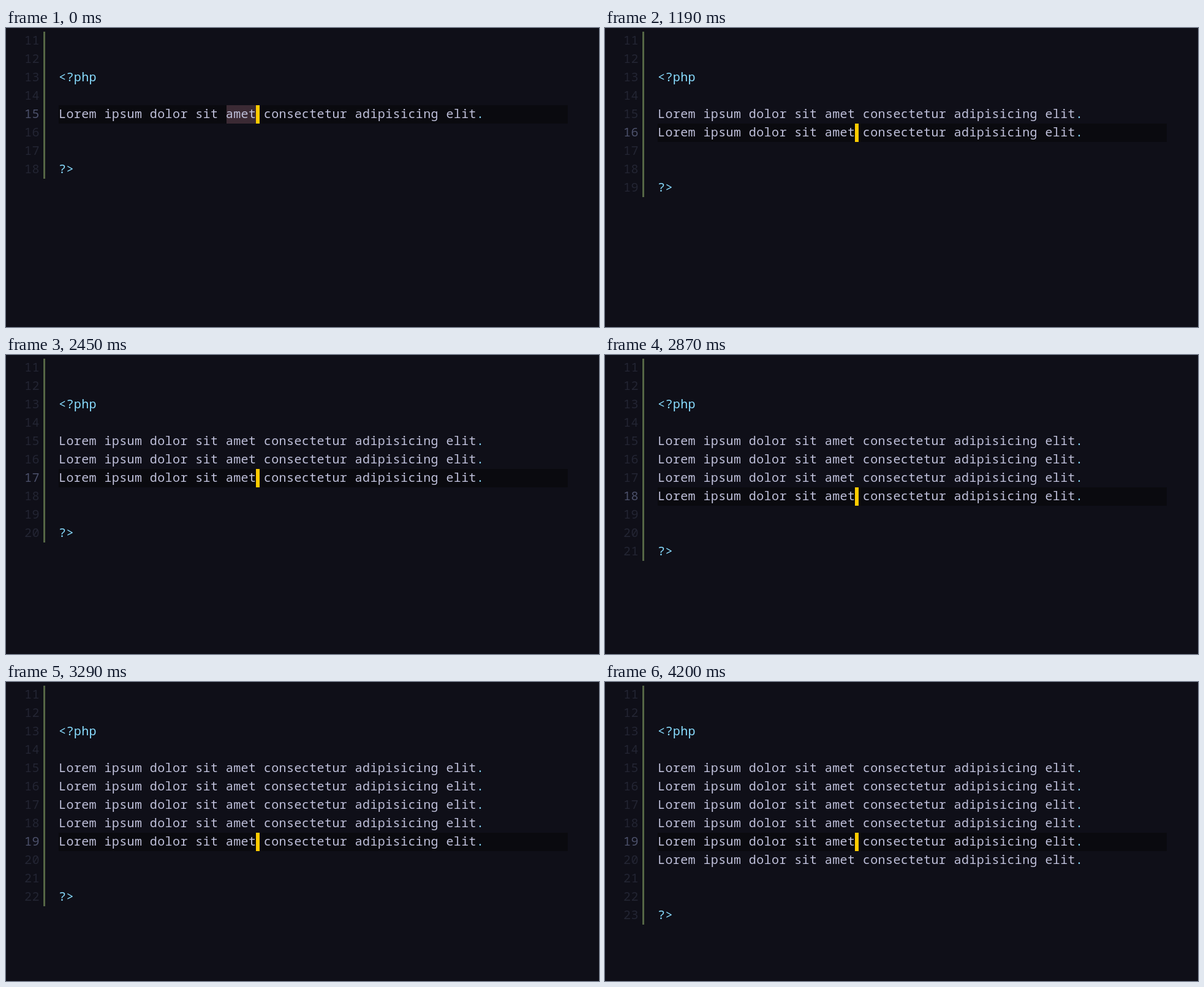
Animation of 968x488 px, one loop 5.04 s. Source, as an HTML page:

```html
<!DOCTYPE html>
<html lang="en">
<head>
<meta charset="utf-8">
<title>Duplicating a line</title>
<style>
  html, body { margin: 0; width: 100%; height: 100%; overflow: hidden; background: #0f0f18; }
  svg { display: block; width: 968px; height: 488px; }
  text {
    font: 400 20px "Noto Sans Mono", "DejaVu Sans Mono", monospace;
    letter-spacing: .4px;
    white-space: pre;
    fill: #bfc0da;
  }
  .number { fill: #232533; }
  .number.current { fill: #4c516b; }
  .tag { fill: #89ddff; font-weight: 500; }
</style>
</head>
<body>
<svg viewBox="0 0 968 488">
  <rect id="band" x="86" width="831" height="30" fill="#0a0a0f"/>
  <rect id="word" x="360" y="126" width="48" height="30" fill="#3b2a34"/>
  <rect id="bar" x="61" y="6" width="3" fill="#556645"/>
  <g id="rows"></g>
  <rect id="cursor" x="408" width="6" height="30" fill="#ffcb00"/>
</svg>
<script>
const LOOP = 5040, ROW = 30, TOP = 6, FIRST = 11, START = 15;
const SENTENCE = 'Lorem ipsum dolor sit amet consectetur adipisicing elit';

// Each step: start time in ms, number of copies, current line number.
const steps = [
  [0, 1, 15], [1190, 2, 16], [2380, 3, 17],
  [2870, 4, 18], [3220, 5, 19], [4130, 6, 19]
];

const el = id => document.getElementById(id);
const rowY = line => TOP + (line - FIRST) * ROW;
const label = (x, line, name, content) =>
  `<text x="${x}" y="${rowY(line) + 21}" class="${name}">${content}</text>`;

function draw(copies, current) {
  const last = START + copies + 2;
  let rows = label(86, 13, 'tag', '&lt;?php') + label(86, last, 'tag', '?&gt;');
  for (let line = FIRST; line <= last; line++) {
    rows += label(30, line, line === current ? 'number current' : 'number', line);
  }
  for (let i = 0; i < copies; i++) {
    rows += label(86, START + i, 'code', `${SENTENCE}<tspan class="tag">.</tspan>`);
  }
  el('rows').innerHTML = rows;
  el('bar').setAttribute('height', (last - FIRST + 1) * ROW);
  for (const id of ['band', 'cursor']) el(id).setAttribute('y', rowY(current));
  el('word').setAttribute('visibility', copies === 1 ? 'visible' : 'hidden');
}

const origin = performance.now();
let shown;
function tick() {
  const time = (performance.now() - origin) % LOOP;
  const step = steps.findLast(([start]) => start <= time);
  if (step !== shown) {
    shown = step;
    draw(step[1], step[2]);
  }
  requestAnimationFrame(tick);
}
tick();
</script>
</body>
</html>
```
